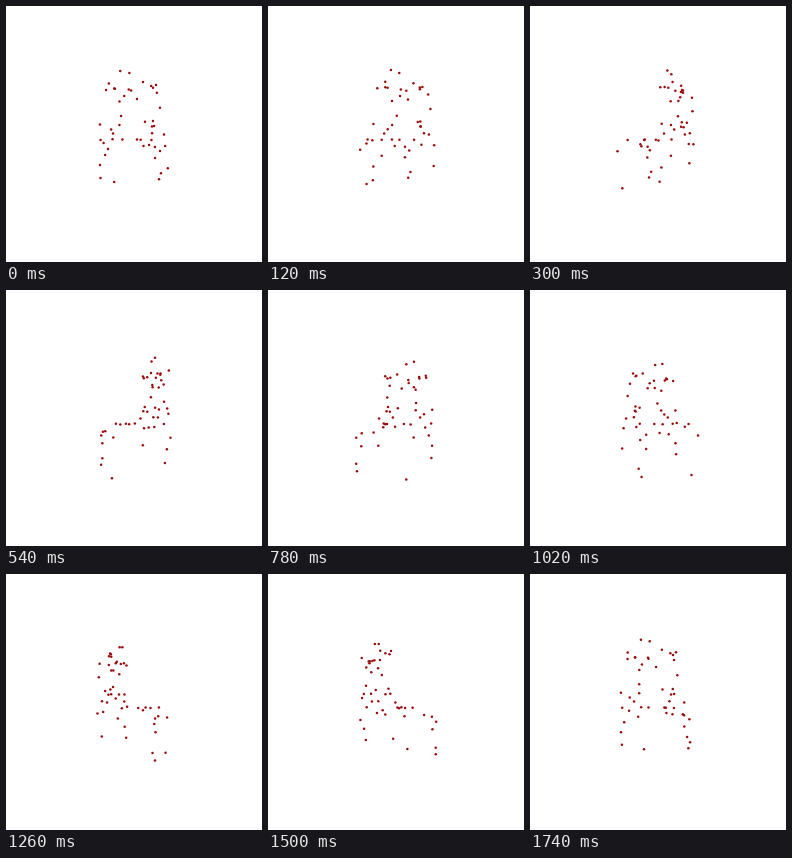
These frames come from a looping animation (256 px wide and 256 px high, 1.8 s). An HTML page with a canvas:

```html
<!DOCTYPE html>
<html lang="en">
<head>
<meta charset="utf-8">
<title>Turning dots</title>
<style>
html, body { margin: 0; width: 100%; height: 100%; overflow: hidden; background: #fff; }
canvas { display: block; width: 256px; height: 256px; }
</style>
</head>
<body>
<canvas id="stage" width="256" height="256"></canvas>
<script>
const ctx = document.getElementById('stage').getContext('2d');
const CENTER = 128, FOCAL = 250, LOOP = 1800, STEP = 60;

// Points in space: x right, y down, z towards the viewer.
const head = [
  [-12.8, -58.6, 17.3], [-4.3, -56.8, 17.1], [8.2, -47.5, 21.6],
  [-22.4, -45, 27.5], [-26, -41, 17.3], [-17.5, -41.5, 20.8],
  [-18.4, -42.3, 17.5], [-4.8, -40.6, 21.6], [-2.6, -38.6, 28.5],
  [-8.7, -33.6, 28.4], [-13.3, -29.8, 21], [2.7, -32, 21.2],
  [15.8, -44.2, 20.2], [17.7, -43.2, 17], [20.5, -45.7, 17],
  [20.3, -36.7, 28], [23.1, -23.4, 27.5]
];
const body = [
  [-11.5, -16.1, 27.5], [-13.3, -8.2, 21.3], [-31.1, -8.6, 21.6],
  [-20.3, -4, 28], [-19.5, -0.5, 17.5], [9.8, -11, 27],
  [17.6, -12, 18], [16.5, -6.9, 20.5], [18.7, -7.4, 16.7],
  [16.1, -0.7, 27.5], [28, 0.5, 16.8], [-23.2, 5.8, -20.3],
  [-12, 5.8, -8.7], [3.2, 5.8, -17.8], [6.8, 5.9, -6.5],
  [17, 5.8, 6.5], [-31, 5.5, 18.3], [-30.5, 9.1, -0.6],
  [13.4, 9.8, 27.5], [27.8, 10.7, 26.6], [10.5, 13.3, -27]
];
const legs = [
  [-28.9, 16.6, -28], [-22, 53.2, -27.6],
  [-25.7, 18.6, 27.6], [-31.1, 28.4, 21.3], [-30.9, 40.7, 19.4],
  [23.2, 14.4, -27], [28.9, 18.8, -27.6], [23.4, 26.6, -27.5],
  [29.8, 43.5, -26.3], [27.8, 50.2, -28], [31, 31.3, 20.7]
];
const points = [...head, ...body, ...legs];

function draw(time) {
  const t = Math.floor(time % LOOP / STEP) * STEP;
  const angle = t / LOOP * 2 * Math.PI;
  const cos = Math.cos(angle), sin = Math.sin(angle);
  ctx.fillStyle = '#fff';
  ctx.fillRect(0, 0, 256, 256);
  ctx.fillStyle = '#9c0c0c';
  for (const [x, y, z] of points) {
    const scale = FOCAL / (FOCAL - (z * cos - x * sin));
    ctx.beginPath();
    ctx.arc(CENTER + (x * cos + z * sin) * scale, CENTER + y * scale, 1.25, 0, 7);
    ctx.fill();
  }
}

const start = performance.now();
function tick() {
  draw(performance.now() - start);
  requestAnimationFrame(tick);
}
tick();
</script>
</body>
</html>
```
